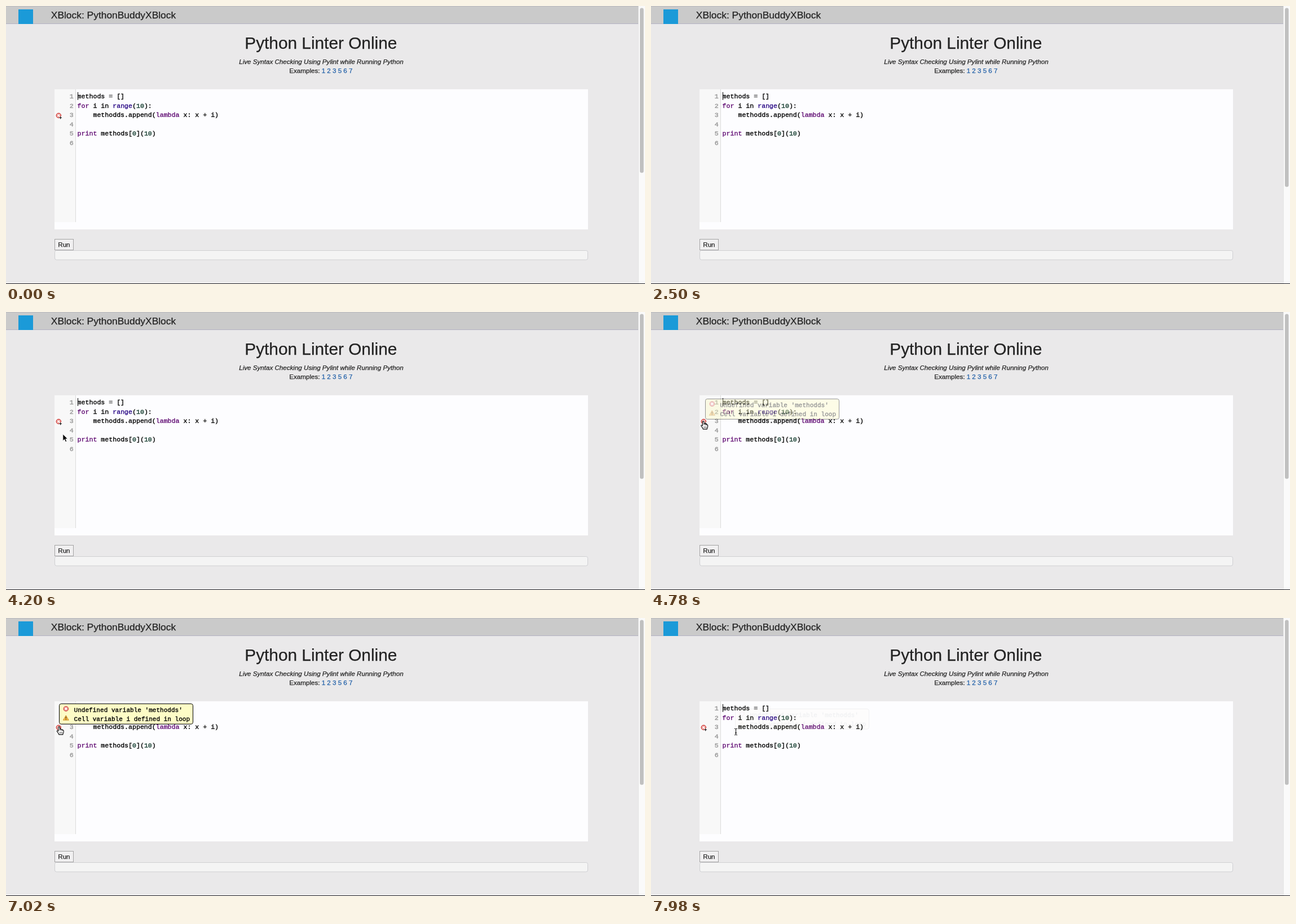
Animation, 1133 px wide and 494 px high, one loop 8 s. Source, as an HTML page:

```html
<!DOCTYPE html>
<html lang="en">
<head>
<meta charset="utf-8">
<title>Python Linter Online</title>
<style>
  html, body { margin: 0; width: 100%; height: 100%; overflow: hidden; background: #eae9ea; }
  svg { display: block; width: 1133px; height: 494px; }
  text { font: 11.6px "Liberation Sans", Arial, sans-serif; color: #222; white-space: pre; }
  text, tspan { fill: currentColor; stroke: currentColor; stroke-width: .25px; }
  .head { font-size: 17.4px; }
  .title { font-size: 29.8px; }
  .sub { font-style: italic; }
  .link { color: #1f5fa8; }
  .code text { font-family: "Liberation Mono", "Courier New", monospace; color: #000; }
  .code text, .code tspan { stroke-width: .35px; }
  .code .num { color: #949494; text-anchor: end; }
  .code .tip { font-size: 11.05px; }
  .kw { color: #5f0a72; }
  .fn { color: #2a0a86; }
  .lit { color: #143c2e; }
</style>
</head>
<body>
<svg viewBox="0 0 1133 494">
  <defs>
    <g id="error">
      <circle r="4.3" fill="#e88a86" stroke="#cf3f3c" stroke-width="1"/>
      <path d="M-1.9-1.9 1.9 1.9M1.9-1.9-1.9 1.9" stroke="#fff" stroke-width="1.6"/>
    </g>
    <g id="warn">
      <path d="M0-4.6 5 4H-5Z" fill="#f6bd4c" stroke="#c98a2b" stroke-width=".9" stroke-linejoin="round"/>
      <path d="M0-2V1.2M0 2V3.2" stroke="#3a2a10" stroke-width="1.2"/>
    </g>
  </defs>

  <rect width="1133" height="494" fill="#eae9ea"/>
  <rect width="1121" height="32" fill="#cacaca"/>
  <rect width="1121" height="1" fill="#b9b9bd"/>
  <rect y="31" width="1121" height="1" fill="#b3b2c4"/>
  <rect x="22" y="6" width="26" height="26" fill="#1b9ad8"/>
  <text class="head" x="79.8" y="21.5">XBlock: PythonBuddyXBlock</text>

  <text class="title" x="423.3" y="76">Python Linter Online</text>
  <text class="sub" x="413.3" y="102.6">Live Syntax Checking Using Pylint while Running Python</text>
  <text x="502.3" y="119.2">Examples: <tspan class="link">1 2 3 5 6 7</tspan></text>

  <rect x="86" y="148" width="946" height="249" fill="#fdfdff"/>
  <rect x="86" y="148" width="37" height="236" fill="#f8f8f8"/>
  <rect x="123" y="148" width="1" height="236" fill="#dcdcdc"/>
  <g class="code" id="code"></g>
  <rect x="127" y="153" width="1" height="14" fill="#000"/>
  <g id="marker" transform="translate(93.3 194.6)">
    <use href="#error"/>
    <path d="M.8 3.9H5.8M3.3 1.4V6.4" stroke="#fff" stroke-width="2.2"/>
    <path d="M1 3.9H5.6M3.3 1.6V6.2" stroke="#000" stroke-width="1.1"/>
  </g>

  <rect x="86.5" y="414.5" width="33" height="19" fill="#f1f0f1" stroke="#a3a3a3"/>
  <text x="92.3" y="428">Run</text>
  <rect x="86.5" y="434.5" width="945" height="16.5" rx="3" fill="#f4f4f4" stroke="#cfcfd2"/>

  <rect x="1121" width="12" height="494" fill="#fafafa"/>
  <rect x="1121" width="1" height="494" fill="#e6e6e6"/>
  <rect id="thumb" x="1124" y="3.5" width="6.6" height="293" rx="3.3" fill="#c0c0c0"/>
  <rect y="493" width="1133" height="1" fill="#1d1d22"/>

  <g class="code" id="tip">
    <rect x=".5" y=".5" width="237" height="36" rx="3.3" fill="#fdfcc6" stroke="#000"/>
    <use href="#error" x="12.3" y="9.3"/>
    <use href="#warn" x="12.3" y="25.6"/>
    <text class="tip" x="26.6" y="14.6">Undefined variable 'methodds'</text>
    <text class="tip" x="26.6" y="30.8">Cell variable i defined in loop</text>
  </g>

  <g id="arrow">
    <path d="M0 0V12L2.8 9.5 4.8 14 6.9 13.1 5 8.7H8.6Z" fill="#000" stroke="#fff" stroke-width=".9"/>
  </g>
  <g id="hand">
    <path d="M-1.6 1C-1.6-.8 1-.8 1 1V4.3C1.6 3.4 3.3 3.7 3.4 4.8 4.2 4.2 5.6 4.6 5.6 5.7 6.5 5.2 7.6 5.8 7.6 7V9C7.6 10.5 6.5 11.4 6.3 13.6H-.7C-.9 11.6-2.4 10.4-3.9 8.2-4.8 6.8-3.2 5.9-2.2 7L-1.6 7.7Z"
          fill="#fff" stroke="#000" stroke-width="1.1" stroke-linejoin="round"/>
    <path d="M1 4.3V6.6M3.4 5V7M5.6 5.8V7.3M1 9V11.6M3 9V11.6M5 9V11.6" stroke="#000" stroke-width=".7"/>
  </g>
  <g id="beam">
    <path d="M-2.4-5.6Q0-5.6 0-4.2Q0-5.6 2.4-5.6M0-4.4V4.8M-1.5 2.2H1.5M-2.4 6Q0 6 0 4.6Q0 6 2.4 6"
          fill="none" stroke="#000"/>
  </g>
</svg>
<script>
const LOOP = 8000;
const $ = id => document.getElementById(id);

// Markup: {class|text}
const lines = [
  "methods = []",
  "{kw|for} i in {fn|range}({lit|10}):",
  "    methodds.append({kw|lambda} x: x + i)",
  "",
  "{kw|print} methods[{lit|0}]({lit|10})",
  ""
];
$("code").innerHTML = lines.map((line, i) => {
  const y = 164.2 + i * 16.57;
  const body = line.replace(/\{(\w+)\|(.*?)\}/g, '<tspan class="$1">$2</tspan>');
  return `<text class="num" x="119.6" y="${y}">${i + 1}</text><text x="126.6" y="${y}">${body}</text>`;
}).join("");

// Rows: time, then values
const mouse = [
  [3240, 124, 291], [3400, 124, 291], [4080, 104, 226], [4500, 93, 194.5],
  [4900, 93, 194.5], [5100, 91.5, 193.5], [6700, 91.5, 193.5], [6900, 94.5, 193.5],
  [7540, 94.5, 193.5], [7980, 150.5, 202]
];
const tipMove = [
  [4620, 96, 154], [4900, 96, 154], [5100, 94, 152], [7540, 94, 152], [7980, 149, 161]
];
const tipFade = [[4620, 0], [5020, 1], [7560, 1], [8000, 0]];
const clean = [600, 2860];

function at(rows, t) {
  if (t <= rows[0][0]) return rows[0].slice(1);
  const i = rows.findIndex(r => r[0] > t);
  if (i < 0) return rows[rows.length - 1].slice(1);
  const a = rows[i - 1], b = rows[i];
  const k = (t - a[0]) / (b[0] - a[0]);
  return a.slice(1).map((v, j) => v + (b[j + 1] - v) * k);
}

const place = (el, x, y) => el.setAttribute("transform", `translate(${x} ${y})`);
const show = (el, on) => el.setAttribute("visibility", on ? "visible" : "hidden");

function pointerKind(t, x, y) {
  if (t < mouse[0][0]) return "";
  if (x > 124) return "beam";
  return x < 99 && y < 201 ? "hand" : "arrow";
}

function draw(t) {
  const isClean = t >= clean[0] && t < clean[1];
  show($("marker"), !isClean);
  $("thumb").setAttribute("height", isClean ? 318 : 293);

  place($("tip"), ...at(tipMove, t));
  $("tip").setAttribute("opacity", at(tipFade, t)[0]);

  const [x, y] = at(mouse, t);
  const kind = pointerKind(t, x, y);
  for (const id of ["arrow", "hand", "beam"]) {
    show($(id), id === kind);
    place($(id), x, y);
  }
}

const start = performance.now();
function tick() {
  draw((performance.now() - start) % LOOP);
  requestAnimationFrame(tick);
}
tick();
</script>
</body>
</html>
```
